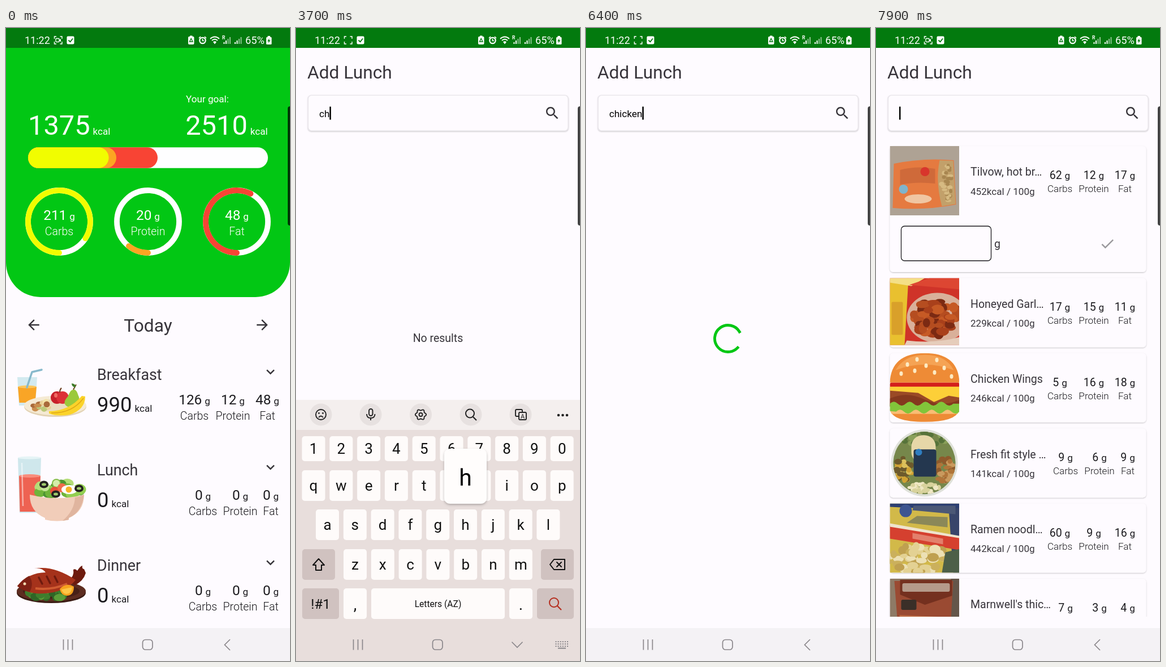
Recreate the animation shown at these times as an HTML page. Size 502x1115 px, loop 8000 ms.

```html
<!DOCTYPE html>
<html lang="en">
<head>
<meta charset="utf-8">
<style>
html, body { margin: 0; width: 100%; height: 100%; overflow: hidden; background: #fefbff; }
svg { display: block; width: 502px; height: 1115px; }
text { font-family: Roboto, sans-serif; white-space: pre; }
</style>
</head>
<body>
<svg id="stage" viewBox="0 0 502 1115" xmlns="http://www.w3.org/2000/svg"></svg>
<script>
const LOOP = 8000, GREEN = '#02c714', INK = '#37343a', DARK = '#1c1b1f', PAPER = '#fefbff';
const SP = 1.22;

// ---- markup helpers ----
const rect = (x, y, w, h, r, fill, more = '') =>
  `<rect x="${x}" y="${y}" width="${w}" height="${h}" rx="${r}" fill="${fill}" ${more}/>`;
const oval = (x, y, rx, ry, fill, more = '') =>
  `<ellipse cx="${x}" cy="${y}" rx="${rx}" ry="${ry}" fill="${fill}" ${more}/>`;
const dot = (x, y, r, fill, more) => oval(x, y, r, r, fill, more);
const path = (d, fill, more = '') => `<path d="${d}" fill="${fill}" ${more}/>`;
const line = (d, color, w, more = '') => path(d, 'none', `stroke="${color}" stroke-width="${w}" ${more}`);
const text = (x, y, size, str, fill = DARK, more = '') =>
  `<text x="${x}" y="${y}" font-size="${size}" fill="${fill}" ${more}>${str}</text>`;
const MID = 'text-anchor="middle"', LIGHT = MID + ' font-weight="300"', ROUND = 'stroke-linecap="round" stroke-linejoin="round"';
const group = (id, inner, more = '') => `<g id="${id}" ${more}>${inner}</g>`;
const icon = (cx, cy, d, fill, id = '') =>
  `<g transform="translate(${cx - 12 * SP} ${cy - 12 * SP}) scale(${SP})">${path(d, fill, id && `id="${id}"`)}</g>`;
const amount = (x, y, size, n, unit, fill = DARK, more = '') =>
  text(x, y, size, `${n}<tspan dx="4.9" font-size="17.1">${unit}</tspan>`, fill, more);

function rng(seed) {
  return () => (seed = (seed * 16807) % 2147483647) / 2147483647;
}
function blobs(n, cx, cy, rx, ry, size, colors, seed) {
  const rnd = rng(seed * 7919);
  let out = '';
  for (let i = 0; i < n; i++) {
    const a = rnd() * 6.28, d = Math.sqrt(rnd());
    out += oval(cx + Math.cos(a) * rx * d, cy + Math.sin(a) * ry * d, size * (.7 + rnd() * .6), size * (.5 + rnd() * .5), colors[i % colors.length]);
  }
  return out;
}

const DOWN = 'M7.41 8.59L12 13.17l4.59-4.58L18 10l-6 6-6-6z';
const BACK = 'M20 11H7.83l5.59-5.59L12 4l-8 8 8 8 1.41-1.41L7.83 13H20z';
const NEXT = 'M4 11H16.17l-5.59-5.59L12 4l8 8-8 8-1.41-1.41L16.17 13H4z';
const LENS = 'M15.5 14h-.79l-.28-.27C15.41 12.59 16 11.11 16 9.5 16 5.91 13.09 3 9.5 3S3 5.91 3 9.5 5.91 16 9.5 16c1.61 0 3.09-.59 4.23-1.57l.27.28v.79l5 4.99L20.49 19zm-6 0C7.01 14 5 11.99 5 9.5S7.01 5 9.5 5 14 7.01 14 9.5 11.99 14 9.5 14z';
const CHECK = 'M9 16.17L4.83 12l-1.42 1.41L9 19 21 7l-1.41-1.41z';

// ---- home page ----
function ring(cx, color, share, n, label) {
  const sweep = share * 360, end = (90 + sweep) * Math.PI / 180, r = 55, cy = 341;
  const arc = `M${cx} ${cy + r}A${r} ${r} 0 ${sweep > 180 ? 1 : 0} 1 ${cx + r * Math.cos(end)} ${cy + r * Math.sin(end)}`;
  return dot(cx, cy, r, 'none', 'stroke="#fff" stroke-width="9.8"') + line(arc, color, 9.8, ROUND)
    + amount(cx, 337.5, 24.4, n, 'g', '#fff', MID) + text(cx, 365, 19.5, label, '#fff', LIGHT);
}

function meal(y, name, kcal, grams, xs, art, id) {
  const labels = ['Carbs', 'Protein', 'Fat'];
  return `<g transform="translate(0 ${y})">` + art
    + text(161, 33.6, 26.86, name, INK) + amount(161, 89.6, 36.6, kcal, 'kcal')
    + icon(467.5, 19.6, DOWN, INK, id)
    + labels.map((l, i) => amount(xs[i], 77, 24.4, grams[i], 'g', DARK, MID) + text(xs[i], 104.4, 19.5, l, DARK, LIGHT)).join('') + '</g>';
}

const breakfastArt = path('M20 29H55L52 79H23Z', '#d3eaf0') + path('M21 46H54L51.5 74H23.5Z', '#f9a526')
  + oval(37.5, 46, 16, 2.5, '#fdc65b') + line('M37 47L46 20L63 16', '#88b9cc', 3.5, ROUND)
  + oval(87, 81, 55, 18, '#e3d3b5') + oval(87, 79, 55, 17, '#f5ead4') + oval(87, 79, 41, 11, '#eadcc0')
  + blobs(13, 60, 79, 15, 8, 6, ['#c98d4e', '#f3e3a8', '#a8693a', '#e9cf96', '#bcc979'], 5)
  + dot(90, 65, 11, '#c7202b') + dot(100, 65, 11, '#dc3038') + oval(88, 61, 3, 4, '#f06a62') + line('M95 56Q95 51 98 48', '#6b3b1c', 2)
  + path('M119 51C125 50 126 57 129 64C132 76 124 84 116 82C104 82 100 74 107 66C112 61 112 52 119 51Z', '#9bc93c')
  + line('M119 51L124 42', '#6b4a1c', 2) + path('M123 47Q116 46 116 40Q124 41 123 47Z', '#3e7d2a')
  + path('M76 89Q111 89 134 62L140 63Q140 86 113 95Q91 99 76 93Z', '#fbd32a') + line('M80 92Q117 93 137 66', '#e0a817', 1.5);

const lunchArt = path('M21 3H62L59 100H24Z', '#cfe7ec') + path('M23 35H61L58.5 98H24.5Z', '#ee6252')
  + oval(42, 35, 19, 3, '#f98d7c') + oval(41.5, 3, 20.5, 2.5, '#e6f4f6') + line('M28 12L30 88', '#fff', 2.5, 'opacity=".5"')
  + blobs(26, 92, 58, 42, 12, 10, ['#6fb43a', '#93cf51', '#4c9433', '#b4dd78'], 11)
  + dot(69, 54, 8, '#c5e597') + dot(89, 48, 8, '#86bd4b') + dot(89, 48, 6, '#d4edaa') + dot(86, 62, 8, '#e9513a') + dot(99, 56, 8, '#f06c4b')
  + oval(112, 59, 14, 8, '#fff') + dot(111, 59, 5.5, '#f7b42a')
  + [[67, 50], [129, 57], [88, 67]].map(([x, y]) => oval(x, y, 6, 4.5, '#9fca6c', 'stroke="#24211f" stroke-width="4"')).join('')
  + path('M42 68Q90 80 138 68Q138 98 111 109V112Q90 117 69 112V109Q42 98 42 68Z', '#f1cdb9') + path('M111 109Q134 99 138 68Q129 72 122 73Q121 96 100 114Q108 113 111 112Z', '#e0b59f');

const dinnerArt = oval(80, 73, 61, 18, '#3b1b14') + oval(80, 70, 61, 18, '#5d2c20') + oval(80, 70, 50, 13, '#482017')
  + blobs(30, 80, 74, 42, 8, 8, ['#3f7d2d', '#5b9d38', '#2f6526'], 9)
  + path('M111 50Q121 44 119 32Q123 30 126 34Q131 26 135 25Q134 31 138 31L141 38Q137 52 121 60Z', '#6d1a0e')
  + path('M20 61Q40 37 70 37Q64 28 50 30Q84 24 123 50Q112 66 84 72Q44 80 20 61Z', '#a5321b')
  + path('M20 61Q29 49 41 43Q50 56 42 71Q28 69 20 61Z', '#7f2114') + dot(33, 57, 2.5, '#f4d9b0') + line('M52 65Q80 69 108 57', '#cf5b31', 4)
  + line('M58 46L64 57M72 44L78 56M86 44L91 54', '#6d1a0e', 3.5, ROUND)
  + path('M95 66Q107 54 120 62Q120 78 107 78Q97 77 95 66Z', '#f7a21e') + path('M98 67L117 63Q116 74 107 75Q100 74 98 67Z', '#fdc648');

const home = rect(0, 0, 502, 1115, 0, PAPER) + path('M0 0H502V413A61 61 0 0 1 441 474H61A61 61 0 0 1 0 413Z', GREEN)
  + text(318, 131, 17.1, 'Your goal:', '#fff')
  + amount(39, 187.6, 48.8, 1375, 'kcal', '#fff') + amount(317.2, 187.6, 48.8, 2510, 'kcal', '#fff')
  + [[424, '#fefeff'], [229, '#f84434'], [156, '#fca522'], [142.6, '#f1fd00']].map(([w, c]) => rect(39, 210.2, w, 36.6, 18.3, c)).join('')
  + ring(94, '#f1fd00', 211 / 251, 211, 'Carbs') + ring(251, '#fca522', 20 / 188, 20, 'Protein') + ring(408, '#f84434', 48 / 83.7, 48, 'Fat')
  + icon(49, 523, BACK, INK) + icon(453, 523, NEXT, INK) + text(251, 535, 31.7, 'Today', INK, MID)
  + `<g clip-path="url(#page)">`
  + meal(586, 'Breakfast', 990, [126, 12, 48], [333, 401, 462], breakfastArt)
  + meal(754, 'Lunch', 0, [0, 0, 0], [348, 414, 468], lunchArt, 'chev')
  + group('dinner', meal(922, 'Dinner', 0, [0, 0, 0], [348, 414, 468], dinnerArt))
  + `<g clip-path="url(#fold)">` + group('addBtn', rect(10.5, 908.5, 481, 70.5, 35, PAPER, `stroke="${GREEN}" stroke-width="1.4"`)
    + line('M175 944H193M184 935V953', GREEN, 2.5) + text(218, 953, 24, 'Add Lunch', GREEN, 'font-weight="500"')) + '</g></g>';

// ---- food photos, 123 x 122 each ----
const photos = [
  rect(0, 0, 123, 122, 0, '#aea294') + path('M7 31Q60 20 113 25L117 103Q60 114 5 109Z', '#e57a40')
    + path('M88 25L112 26L116 102L92 106Q80 62 88 25Z', '#c2a06a') + blobs(30, 100, 66, 9, 34, 4, ['#d6ba82', '#a88650'], 3)
    + path('M18 42Q48 34 80 40V66Q48 62 18 68Z', '#cf6a3a') + dot(62, 45, 8, '#d8352c') + oval(50, 93, 24, 8, '#f0c6a2') + dot(24, 76, 8, '#7fb4cc'),
  rect(0, 0, 123, 118, 0, '#cf3329') + path('M0 4L33 0L26 118H0Z', '#e9c02f') + path('M0 0H62L38 14L0 8Z', '#f4df86') + path('M34 12L70 0H123V20Z', '#dd4632') + rect(3, 42, 20, 58, 2, '#d9a02a')
    + oval(84, 70, 54, 44, '#d9b09a') + blobs(80, 81, 68, 40, 33, 9, ['#a9401b', '#c65a25', '#7b2a13', '#b54d20'], 8) + path('M30 110Q80 116 123 104V118H26Z', '#e6cdbb'),
  path('M0 52Q2 0 62 0Q121 0 123 52Z', '#ee8b36') + path('M10 30Q26 3 62 3Q99 3 113 30Q62 10 10 30Z', '#f5a354')
    + [[31, 20], [48, 11], [64, 22], [83, 12], [96, 26], [44, 31], [79, 34], [20, 36], [109, 41]].map(([x, y]) => oval(x, y, 3, 4, '#fdeac2')).join('')
    + rect(0, 52, 123, 9, 3, '#d31f1c') + rect(0, 60, 123, 34, 0, '#9a4a26') + path('M0 59H123V78L104 75L78 86L50 70L0 66Z', '#fdcf38')
    + path('M0 80Q30 66 62 82Q94 96 123 82V94H0Z', '#84391e') + path('M0 99H123Q119 121 62 121Q4 121 0 99Z', '#ee8b36') + path('M0 99H123L120 107H3Z', '#f9bd74')
    + path('M0 89' + 'q7 -7 14 0t14 0'.repeat(4) + 'l11 0V103' + 'q-7 7 -14 0t-14 0'.repeat(4) + 'L0 102Z', '#82c53a'),
  dot(61, 61, 59, '#dfe1da') + '<g clip-path="url(#bowl)">' + rect(0, 0, 123, 122, 0, '#76874b') + blobs(34, 24, 72, 17, 20, 6, ['#d0a233', '#6d5a2c', '#dcc05c'], 4)
    + blobs(36, 98, 74, 16, 22, 6, ['#b0753a', '#8e5a2c', '#c99a5e'], 6) + blobs(30, 61, 106, 28, 9, 5, ['#efe7c4', '#d8d29c'], 2)
    + blobs(34, 61, 18, 42, 12, 6, ['#56733a', '#8aa05a'], 5) + rect(38, 12, 43, 50, 20, '#e6d7a8') + rect(42, 37, 40, 48, 4, '#24374f') + dot(51, 42, 6, '#2f7dc0') + '</g>',
  rect(0, 0, 123, 122, 0, '#d2b949') + path('M0 0H123V12L0 6Z', '#2c3f72') + path('M104 8H123V122H112Z', '#38456a') + path('M42 4H116V19L40 12Z', '#4b5876')
    + dot(28, 13, 11, '#3d5590') + path('M48 22L102 24V42L30 34Z', '#8b8858') + path('M0 38L123 60V82L0 62Z', '#d5402f') + path('M0 35L123 57V61L0 41Z', '#efe3cc') + path('M40 52L94 62V72L40 62Z', '#e3806c')
    + blobs(70, 52, 97, 58, 24, 8, ['#e3d193', '#cbb05c', '#ece0b4', '#bfa050'], 13) + path('M98 86L123 80V122H92Z', '#4d5f48'),
  rect(0, 0, 123, 122, 0, '#8e7a66') + rect(108, 0, 15, 122, 0, '#64564a') + path('M8 4H112L105 122H17Z', '#9a4a32') + path('M18 2H110V30L62 46L18 28Z', '#74301f')
    + rect(22, 8, 84, 15, 3, '#b59a8a') + rect(20, 37, 27, 18, 3, '#3a2f28') + path('M17 64L108 68V90L18 86Z', '#bd6b42')
    + blobs(30, 64, 108, 40, 11, 7, ['#d9b084', '#c2855a', '#a9563a'], 7),
  rect(0, 0, 123, 122, 0, '#a89062') + rect(10, 0, 92, 34, 4, '#d2bf90') + path('M32 14Q62 6 100 16V26Q62 18 32 28Z', '#a5583f') + dot(18, 16, 9, '#7d8450') + rect(104, 0, 19, 122, 0, '#7b4a33')
];

const foods = [
  ['Tilvow, hot br…', 452, 62, 12, 17], ['Honeyed Garl…', 229, 17, 15, 11], ['Chicken Wings', 246, 5, 16, 18],
  ['Fresh fit style …', 141, 9, 6, 9], ['Ramen noodl…', 442, 60, 9, 16], ['Marnwell\'s thic…', 75, 7, 3, 4], ['', 0, 0, 0, 0]
];

function card([name, kcal, ...grams], i) {
  const y = 208 + 132.4 * i, xs = grams[2] > 9 ? [325, 385, 440] : [335, 395, 445];
  const size = `x="24.5" y="${y}" width="453" height="122" rx="6"`;
  let out = `<rect ${size} ${i ? '' : 'class="grow"'} fill="${PAPER}" filter="url(#lift)"/>`
    + `<g class="photo" clip-path="url(#thumb)" transform="translate(24.5 ${y})">${photos[i]}</g>`;
  if (name) out += text(167, y + 52.4, 19.5, name, INK) + text(167, y + 85.5, 17.1, kcal + 'kcal / 100g', INK)
    + ['Carbs', 'Protein', 'Fat'].map((l, k) => amount(xs[k], y + 58, 19.5, grams[k], 'g', DARK, MID) + text(xs[k], y + 81, 17.1, l, DARK, LIGHT)).join('');
  return out;
}

const cards = foods.map(card);
const addPage = rect(0, 0, 502, 1115, 0, PAPER) + text(20, 88.6, 31.7, 'Add Lunch', INK)
  + rect(21.5, 118.5, 459.5, 62.5, 6, PAPER, 'stroke="#e6e3e8" stroke-width="1.2" filter="url(#lift)"')
  + icon(453, 150, LENS, INK) + text(41, 157, 17.1, '', '#000', 'id="query"') + rect(41, 138.5, 2.5, 23, 0, '#000', 'id="caret"')
  + text(251, 553, 19.5, 'No results', INK, MID + ' id="none"') + line('', GREEN, 4.9, 'id="spin" stroke-linecap="square"')
  + group('results', cards[0] + group('portion', rect(44.5, 349, 159, 61, 6, 'none', `stroke="${DARK}" stroke-width="1.3"`)
    + text(209, 387, 19.5, 'g', INK) + icon(409, 380, CHECK, '#9b999d'), 'clip-path="url(#open)"')
    + group('rest', cards.slice(1).join('')), 'clip-path="url(#page)"');

// ---- keyboard ----
const STEP = 48.8, keyAt = {};
function keyRow(chars, x, y, h) {
  return [...chars].map((c, i) => {
    const kx = x + STEP * i;
    keyAt[c] = [kx + 20.5, y];
    return rect(kx, y, 41, h, 5, '#fefbfa') + text(kx + 20.5, y + h / 2 + 9, 26, c, '#111', MID);
  }).join('');
}
const wideKey = (x, y, w) => rect(x, y, w, 54, 5, '#d0c2c0');
const gear = 'M' + Array.from({ length: 49 }, (_, i) => {
  const a = i * Math.PI / 24, r = 8.5 + 1.2 * Math.cos(6 * a);
  return (220.5 + r * Math.cos(a)).toFixed(1) + ' ' + (681 + r * Math.sin(a)).toFixed(1);
}).join('L') + 'Z';

const keyboard = rect(0, 655, 502, 54, 0, '#f4efee') + rect(0, 708, 502, 407, 0, '#e8dedc')
  + [44, 132, 220.5, 309, 397].map(x => dot(x, 681, 19.5, '#e7e1e0')).join('')
  + dot(44, 681, 9, 'none', 'stroke="#222" stroke-width="1.9"') + dot(40.5, 678.5, 1.4, '#222') + dot(47.5, 678.5, 1.4, '#222')
  + line('M39 683Q44 689 49 683', '#222', 1.8, 'id="mouth"')
  + rect(129, 671, 6.5, 12, 3.2, 'none', 'stroke="#222" stroke-width="1.9"') + line('M125 680Q125 687 132 687Q139.5 687 139.5 680M132 687V691', '#222', 1.9)
  + line(gear, '#222', 1.9) + dot(220.5, 681, 3, 'none', 'stroke="#222" stroke-width="1.9"')
  + line('M313 685L319 691', '#222', 2.2) + dot(307.5, 679, 7.5, 'none', 'stroke="#222" stroke-width="2"')
  + rect(388, 672, 12, 12, 2, 'none', 'stroke="#222" stroke-width="1.9"') + rect(394, 677, 13, 13, 2, '#e7e1e0', 'stroke="#222" stroke-width="1.9"') + text(400.5, 688, 11, 'A', '#222', MID)
  + [464, 471.5, 479].map(x => dot(x, 682, 2.3, '#222')).join('')
  + keyRow('1234567890', 10.5, 719, 44) + keyRow('qwertyuiop', 10.5, 779, 54) + keyRow('asdfghjkl', 35, 848, 54) + keyRow('zxcvbnm', 84, 918, 54)
  + wideKey(11, 918, 58) + line('M40 935L50 946H45V955H35V946H30Z', '#111', 2, ROUND)
  + wideKey(433, 918, 58) + line('M449 945L456 936H475V954H456ZM461 941L469 949M469 941L461 949', '#111', 2, ROUND)
  + wideKey(11, 987, 65) + text(43.5, 1023, 24, '!#1', '#111', MID)
  + rect(84, 987, 41, 54, 5, '#fefbfa') + text(104.5, 1025, 28, ',', '#111', MID)
  + rect(133, 987, 236, 54, 5, '#fefbfa') + text(251, 1020, 15.6, 'Letters (AZ)', '#111', MID)
  + rect(377, 987, 41, 54, 5, '#fefbfa') + text(397.5, 1025, 28, '.', '#111', MID)
  + wideKey(426, 987, 65) + dot(456, 1012, 8, 'none', 'stroke="#b52d1d" stroke-width="2"') + line('M462 1018L469 1025', '#b52d1d', 2.2)
  + group('bubble', rect(-37.5, -107, 75, 97, 10, '#fffdfc', 'filter="url(#pop)"') + text(0, -42, 41, '', '#000', MID + ' id="bubbleText"'));

// ---- system bars ----
const bars = n => [0, 1, 2, 3].map(i => rect(n + i * 3.5, 25 - i * 3, 2, 3 + i * 3, 0, '#fff', i > 1 ? 'opacity=".55"' : '')).join('');
const status = rect(0, 0, 502, 35, 0, '#037a0e') + text(33, 28, 18, '11:22', '#fff')
  + line('M89 15H85.5V19M95.5 15H99V19M89 28H85.5V24M95.5 28H99V24', '#fff', 1.4)
  + group('cam', rect(88, 18.5, 6, 6, 1, 'none', 'stroke="#fff" stroke-width="1.3"') + path('M94 21L97 19V24.5L94 22.5Z', '#fff'))
  + rect(107.5, 14.5, 13, 14, 2, '#fff') + line('M110.5 21.5L113.5 24.5L118 18.5', '#037a0e', 1.8)
  + rect(322, 15, 10.5, 14, 2, '#fff') + rect(325, 13.5, 4.5, 2, 0, '#fff') + line('M324.5 24L327.2 18.5L330 24Z', '#037a0e', 1.3)
  + dot(347.5, 22, 5.2, 'none', 'stroke="#fff" stroke-width="2.2"') + line('M347.5 19V22.5H350M341 18L344 15M354 18L351 15', '#fff', 1.7)
  + line('M361 19Q369 12 377 19M364 22Q369 17.5 374 22', '#fff', 1.8) + path('M366 24.5Q369 22 372 24.5L369 28.5Z', '#fff')
  + text(382, 20, 8.5, 'R', '#fff', 'font-weight="700"') + bars(384.5) + bars(404) + text(423, 28, 18.2, '65%', '#fff')
  + rect(460, 16, 9.5, 13, 1.5, '#fff') + rect(462.5, 14, 4.5, 2.5, 0, '#fff') + path('M465.5 18L462 23.5H464.5L463.5 27L467.5 21.5H465Z', '#037a0e');

const GREY = '#8a878b';
let keyDots = '';
for (let i = 0; i < 18; i++) keyDots += rect(458.5 + i % 6 * 4.1, 1080 + Math.floor(i / 6) * 4, 2, 2, 0, GREY);
const nav = line('M101.5 1077V1095.5M109.5 1077V1095.5M117.5 1077V1095.5', GREY, 1.7)
  + rect(241.5, 1077.5, 17.5, 17.5, 5, 'none', `stroke="${GREY}" stroke-width="1.7"`)
  + line('', GREY, 1.7, 'id="navBack"') + group('navKeys', keyDots + rect(463, 1091.5, 14, 2, 0, GREY));

const clip = (id, attrs, rid = '') => `<clipPath id="${id}"><rect ${rid && `id="${rid}"`} ${attrs}/></clipPath>`;
const shadow = (id, dy, blur, o) => `<filter id="${id}" x="-20%" y="-20%" width="140%" height="150%"><feDropShadow dx="0" dy="${dy}" stdDeviation="${blur}" flood-opacity="${o}"/></filter>`;
document.getElementById('stage').innerHTML = '<defs>'
  + clip('page', 'x="0" y="0" width="502" height="1037"') + clip('fold', 'x="0" y="907" width="502" height="0"', 'foldRect')
  + clip('thumb', 'width="122.5" height="122"') + clip('bowl', 'x="6" y="6" width="110" height="110" rx="55"')
  + clip('open', 'x="24" y="330" width="454" height="0"', 'openRect')
  + shadow('lift', 1, 1, .25) + shadow('pop', 2, 2, .25) + '</defs>'
  + rect(0, 0, 502, 1115, 0, PAPER) + group('home', home) + group('add', addPage)
  + rect(0, 1057, 502, 58, 0, '#f4f2f5') + group('keys', keyboard) + nav + status
  + rect(498, 138, 8, 210, 4, '#000', 'opacity=".74"');

// ---- motion ----
const $ = id => document.getElementById(id);
const set = (id, key, val) => $(id).setAttribute(key, val);
const show = (id, on) => set(id, 'display', on ? 'inline' : 'none');
const ramp = (t, a, b) => Math.min(1, Math.max(0, (t - a) / (b - a)));
const out = p => 1 - (1 - p) ** 3;
const smooth = p => p * p * (3 - 2 * p);
const shiftY = (id, y) => set(id, 'transform', `translate(0 ${y})`);

const WORD = 'chicken', HITS = [3300, 3620, 3900, 4200, 4500, 4850, 5340];
const FOCUS = 2400, SEARCH = 5780, FOUND = 6450;
const grow = document.querySelector('.grow'), pics = document.querySelectorAll('.photo');

function spinner(t) {
  const u = (t - SEARCH) / 1332;
  const tail = 290 * smooth(ramp(u, .5, 1)), sweep = Math.max(.3, 290 * smooth(ramp(u, 0, .5)) - tail);
  const a = (u * 286 + tail - 90) * Math.PI / 180, b = a + sweep * Math.PI / 180, r = 23.5;
  const at = v => `${251 + r * Math.cos(v)} ${547 + r * Math.sin(v)}`;
  return `M${at(a)}A${r} ${r} 0 ${sweep > 180 ? 1 : 0} 1 ${at(b)}`;
}

function draw(t) {
  const fold = out(ramp(t, 340, 720));
  set('foldRect', 'height', 72 * fold);
  shiftY('addBtn', -72 * (1 - fold));
  set('addBtn', 'opacity', fold);
  shiftY('dinner', 72 * fold);
  set('chev', 'transform', t >= 400 ? 'rotate(180 12 12)' : '');

  const swap = smooth(ramp(t, 1540, 1900));
  set('home', 'opacity', 1 - swap);
  show('home', swap < 1);
  set('add', 'opacity', swap);
  show('add', swap > 0);
  show('cam', t < 2100 || t >= 7800);

  const typed = HITS.filter(h => t >= h).length, found = t >= FOUND;
  $('query').textContent = found ? '' : WORD.slice(0, typed);
  const edit = found ? FOUND : typed ? HITS[typed - 1] : FOCUS;
  show('caret', t >= FOCUS && (t - edit) % 1000 < 500);
  const width = !found && typed ? $('query').getComputedTextLength() : 0;
  set('caret', 'x', 41 + width);

  const press = typed && t - HITS[typed - 1] < 170;
  show('bubble', press);
  if (press) {
    const [x, y] = keyAt[WORD[typed - 1]];
    set('bubble', 'transform', `translate(${x} ${y})`);
    $('bubbleText').textContent = WORD[typed - 1];
  }
  const up = out(ramp(t, 2540, 2950)) - smooth(ramp(t, 5830, 6130));
  shiftY('keys', 460 * (1 - up));
  show('keys', up > 0);
  set('mouth', 'd', t > 3200 && t < 4100 ? 'M40 686Q44 681 48 686' : 'M39 683Q44 689 49 683');
  const typing = t >= FOCUS && t < 6130;
  set('navBack', 'd', typing ? 'M381.5 1081.5L391 1091L400.5 1081.5' : 'M396 1077L386.5 1086.5L396 1096');
  show('navKeys', typing);

  show('none', t < SEARCH);
  const busy = t >= SEARCH && !found;
  show('spin', busy);
  if (busy) set('spin', 'd', spinner(t));
  show('results', found);
  pics.forEach((p, i) => p.setAttribute('opacity', ramp(t, 6480 + i * 20, 6640 + i * 20)));

  const open = out(ramp(t, 7730, 7900));
  grow.setAttribute('height', 122 + 100 * open);
  set('openRect', 'height', 100 * open);
  set('portion', 'opacity', open);
  shiftY('rest', 100 * open);
}

function frame(now) {
  draw(now % LOOP);
  requestAnimationFrame(frame);
}
draw(0);
requestAnimationFrame(frame);
</script>
</body>
</html>
```
